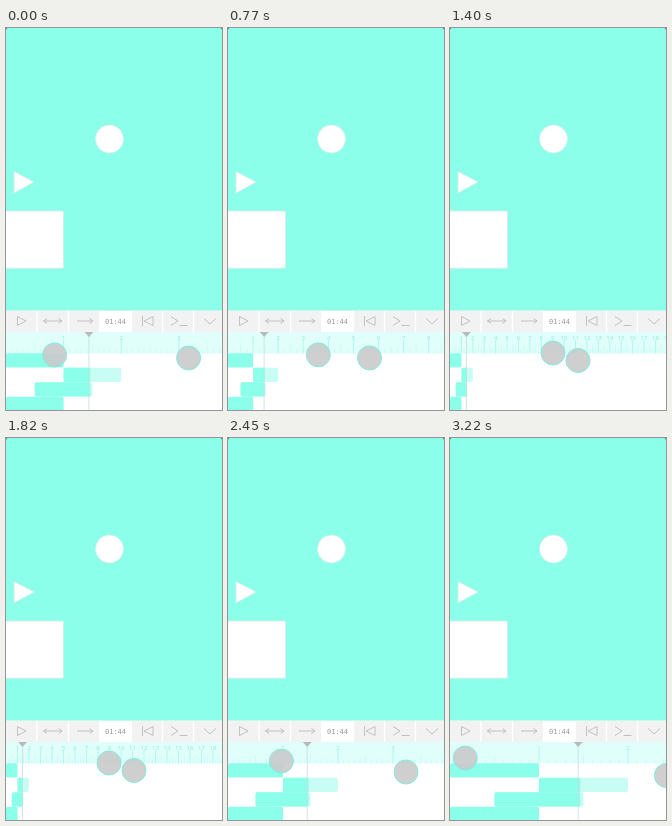
Recreate the animation shown at these times as an HTML page. Size 216 by 382 pixels, loop 3290 ms.

```html
<!DOCTYPE html>
<html lang="en">
<head>
<meta charset="utf-8">
<title>Timeline pinch zoom</title>
<style>
html, body { margin: 0; height: 100%; overflow: hidden; background: #222; }
svg { display: block; width: 100vw; height: 100vh; }
.icons { fill: none; stroke: #bcbcbc; stroke-width: .9; }
.clock { font: 7px "DejaVu Sans Mono", monospace; fill: #999; text-anchor: middle; }
.num { font: 6px "Open Sans", sans-serif; fill: #8fe8dc; text-anchor: middle; }
</style>
</head>
<body>
<svg viewBox="0 0 216 382">
  <rect width="216" height="382" rx="1.5" fill="#8cffea"/>
  <g fill="#fff" stroke="#d8ebe7" stroke-width=".8">
    <circle cx="103.5" cy="111" r="14"/>
    <path d="M8 143.5L28 154L8 165Z"/>
    <rect x="-3" y="183" width="60.5" height="57.2" rx="1.5"/>
  </g>
  <rect y="282.4" width="216" height="21.6" fill="#f2f2f2"/>
  <rect x="93" y="283" width="33" height="21" fill="#fff"/>
  <path d="M31 283V304M62.5 283V304M156.5 283V304M187.5 283V304" stroke="#fff" stroke-width="1.4"/>
  <g class="icons">
    <path d="M11.5 288.5L20 293L11.5 297.5Z"/>
    <path d="M37.5 293H56M41 290.5L37.5 293L41 295.5M52.5 290.5L56 293L52.5 295.5"/>
    <path d="M71 293H87M83.5 290.5L87 293L83.5 295.5"/>
    <path d="M136.5 288V298M147 288.5L138 293L147 297.5Z"/>
    <path d="M165 288.5L172 293L165 297.5M173.5 297.5H181.5"/>
    <path d="M198 290.5L204 296L210 290.5"/>
  </g>
  <text class="clock" x="109.5" y="295.5">01:44</text>
  <rect y="304" width="216" height="78" fill="#fff"/>
  <rect y="304" width="216" height="21.5" fill="#e0fffb"/>
  <g id="timeline"></g>
</svg>
<script>
const LOOP = 3290, STEP = 70, HEAD = 1.44, FILLED = 1.465;
const CYAN = "#8cffea", PALE = "#c8fdf5";
const layer = document.getElementById("timeline");

// time, pixels per second, left finger x y, right finger x y
const KEYS = [
  [0, 57.6, 48.6, 327, 182.6, 330],
  [490, 38.5, 74.5, 328, 157, 328.5],
  [1050, 13.9, 101.5, 325.3, 130, 332],
  [1190, 11.4, 103, 325, 128, 332.5],
  [1820, 11.5, 103, 325, 128, 332.5],
  [2100, 34.7, 76.4, 326.3, 154.8, 331],
  [2450, 55, 53.4, 323, 178, 334],
  [3010, 88.6, 15.6, 320, 216, 337.5],
  [3220, 89, 15.2, 320, 216.4, 337.5]
];

const slope = (i, k) => (KEYS[i + 1][k] - KEYS[i][k]) / (KEYS[i + 1][0] - KEYS[i][0]);

// Tangent that never overshoots the keys
function tangent(i, k) {
  if (i === 0) return slope(0, k);
  if (i === KEYS.length - 1) return slope(i - 1, k);
  const a = slope(i - 1, k), b = slope(i, k);
  return a * b > 0 ? 2 * a * b / (a + b) : 0;
}

function sample(t, k) {
  let i = 0;
  while (i < KEYS.length - 2 && t > KEYS[i + 1][0]) i++;
  const a = KEYS[i], b = KEYS[i + 1], d = b[0] - a[0];
  const u = Math.min(1, (t - a[0]) / d), v = 1 - u;
  return v * v * (1 + 2 * u) * a[k] + u * u * (3 - 2 * u) * b[k]
    + d * u * v * (v * tangent(i, k) - u * tangent(i + 1, k));
}

const rect = (x, y, w, h, fill, r = 0) =>
  `<rect x="${x}" y="${y}" width="${w}" height="${h}" fill="${fill}" rx="${r}"/>`;

function ruler(scale) {
  let out = "";
  const parts = scale > 30 ? 10 : 4;
  for (let n = 1; n * scale / parts < 222; n++) {
    const x = n * scale / parts, whole = n % parts === 0, half = n % (parts / 2) === 0;
    const top = whole ? 312 : half ? 317 : 321;
    out += `<path d="M${x} ${top}V325.5" stroke="#a5f5e9" stroke-width=".8" opacity="${whole ? 1 : .45}"/>`;
    if (whole) out += `<text class="num" x="${x}" y="312">${n / parts}</text>`;
  }
  return out;
}

function bar(from, to, y, scale) {
  const x = from * scale, split = Math.min(to, FILLED) * scale;
  const rest = to > FILLED ? rect(x, y, to * scale - x, 14.3, PALE, 2) : "";
  return rest + rect(x, y, split - x, 14.3, CYAN, 1.5);
}

const finger = (x, y) =>
  `<circle cx="${x}" cy="${y}" r="12" fill="#cacaca" fill-opacity=".9" stroke="#7deedf"/>`;

function draw(t) {
  const [scale, lx, ly, rx, ry] = [1, 2, 3, 4, 5].map(k => sample(t, k));
  const x = HEAD * scale;
  layer.innerHTML = ruler(scale)
    + bar(0, 1, 325.2, scale) + bar(1, 2, 339.8, scale)
    + bar(.5, 1.5, 354.2, scale) + bar(0, 1, 368.8, scale)
    + `<path d="M${x} 308V382" stroke="#c3dfda" stroke-width=".8"/>`
    + `<path d="M${x - 4.5} 304H${x + 4.5}L${x} 309Z" fill="#b5bdbb"/>`
    + finger(lx, ly) + finger(rx, ry);
}

let shown = -1;
function tick() {
  const step = Math.floor(performance.now() % LOOP / STEP);
  if (step !== shown) draw((shown = step) * STEP);
  requestAnimationFrame(tick);
}
tick();
</script>
</body>
</html>
```
